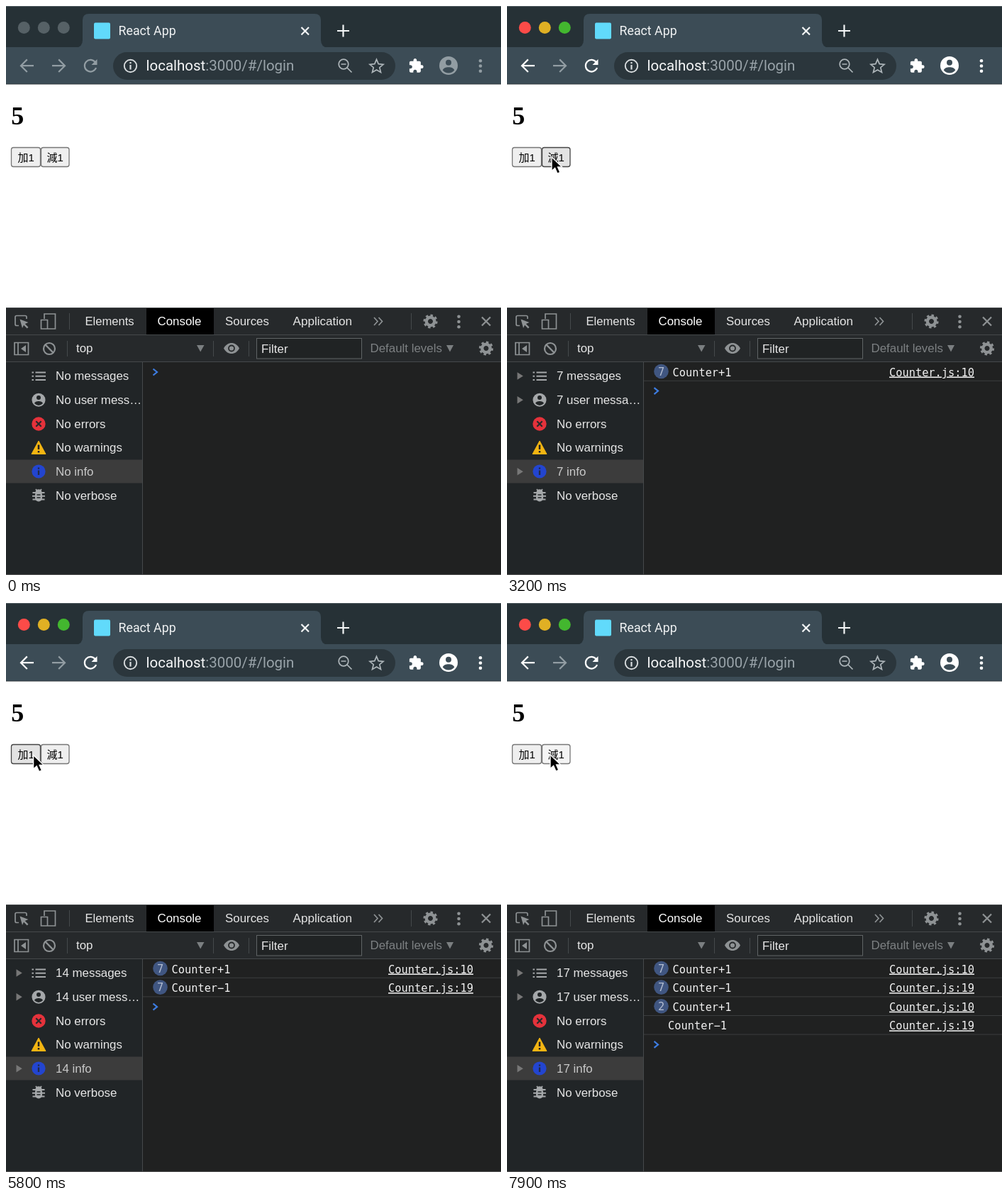
These frames come from a looping animation (698x802 px, 8000 ms). An HTML page:

```html
<!DOCTYPE html>
<html lang="zh-Hant">
<head>
<meta charset="utf-8">
<title>Counter</title>
<style>
html, body { margin: 0; width: 100%; height: 100%; overflow: hidden; background: #202121; }
svg { display: block; width: 698px; height: 802px; }
text { white-space: pre; }
.chrome { font-family: Roboto, sans-serif; }
.tools { font: 16.9px "Liberation Sans", Arial, sans-serif; fill: #e6e6e6; }
.log { font: 15.33px "DejaVu Sans Mono", monospace; fill: #f2f2f2; }
.page { font: 15px "Liberation Sans", "Noto Sans CJK TC", "Noto Sans CJK JP", "Noto Sans CJK SC", "Noto Sans CJK", sans-serif; }
.line { fill: none; stroke: currentColor; stroke-width: 2.2; }
.thin { stroke-width: 1.7; }
.focus { color: #fff; }
.idle .focus { color: #929da3; }
.idle .light { fill: #566166; }
.btn { fill: #efefef; stroke: #767676; }
.btn.hover { fill: #e3e3e3; stroke: #454545; }
.btn.press { fill: #f4f4f4; stroke: #777; }
</style>
</head>
<body>
<svg id="stage" viewBox="0 0 698 802">
  <defs>
    <g id="gear" fill="none" stroke="currentColor">
      <circle r="5.7" stroke-width="4.4"/>
      <circle r="8.4" stroke-width="3.4" pathLength="16" stroke-dasharray="1"/>
    </g>
    <g id="kebab" fill="currentColor"><circle cy="-7.2" r="2.3"/><circle r="2.3"/><circle cy="7.2" r="2.3"/></g>
    <path id="caret" d="M-3.5-5.2L4.8 0L-3.5 5.2z" fill="#777"/>
  </defs>

  <!-- browser frame -->
  <g class="chrome">
    <rect width="698" height="60" fill="#263136"/>
    <path d="M0 .5H698" stroke="#596368"/>
    <rect y="58" width="698" height="52" fill="#3c4c56"/>
    <path d="M98 59Q108 58 108 48V20Q108 11 117 11H435Q444 11 444 20V48Q444 58 454 59z" fill="#3c4c56"/>
    <path d="M0 110H698" stroke="#2d383e"/>
    <circle class="light" cx="25.300" cy="30.500" r="8.500" fill="#fc4b48"/>
    <circle class="light" cx="53.300" cy="30.500" r="8.500" fill="#e0b024"/>
    <circle class="light" cx="81.300" cy="30.500" r="8.500" fill="#43b72f"/>
    <rect x="124" y="23.500" width="23" height="23" rx="2" fill="#61dafb"/>
    <text x="158.500" y="41" font-size="17.800" fill="#f1f3f4">React App</text>
    <g color="#f4f6f7">
      <path class="line" d="M416.500 30L427 40.500M427 30L416.500 40.500M467 35H484M475.500 26.500V43.500"/>
    </g>
    <rect x="151" y="65" width="398" height="39" rx="19.500" fill="#2b363c"/>
    <g color="#d8dcde">
      <circle class="line" cx="175.500" cy="84.500" r="8.700" style="stroke-width:1.9"/>
      <path class="line" d="M175.500 83V89.500M175.500 79V81.300"/>
    </g>
    <text x="197.500" y="91" font-size="20.500" fill="#9aa4aa"><tspan fill="#f6f7f8">localhost</tspan>:3000/#/login</text>
    <g color="#aeb6ba">
      <circle class="line thin" cx="476" cy="82" r="6.800"/>
      <path class="line thin" d="M481 87L487.500 93.500M472.500 82H479.500"/>
      <path class="line thin" d="M522.500 75.300L525.200 81.700L532 82.300L526.800 86.700L528.500 93.500L522.500 89.900L516.500 93.500L518.200 86.700L513 82.300L519.800 81.700z"/>
    </g>
    <g class="focus">
      <path class="line" d="M39 84.200H21M29.800 75.400L21 84.200L29.800 93"/>
      <path class="line" d="M126 79.500A8.300 8.300 0 1 0 127 87"/>
      <path d="M128.500 75V83H120.500z" fill="currentColor"/>
      <circle cx="624" cy="84" r="13" fill="currentColor"/>
      <circle cx="624" cy="79.800" r="4" fill="#3c4c56"/>
      <path d="M615.800 90.500C617 84.800 631 84.800 632.200 90.500Q629 94.500 624 94.500T615.800 90.500z" fill="#3c4c56"/>
      <use href="#kebab" x="669" y="84.500"/>
    </g>
    <path class="line" color="#929da3" d="M65 84.200H83M74.200 75.400L83 84.200L74.200 93"/>
    <path transform="translate(567 73) scale(.94)" fill="#fff" d="M20.500 11H19V7c0-1.100-.9-2-2-2h-4V3.500C13 2.120 11.880 1 10.500 1S8 2.120 8 3.500V5H4c-1.100 0-2 .9-2 2v3.800h1.500c1.490 0 2.700 1.210 2.700 2.700s-1.210 2.700-2.700 2.700H2V20c0 1.100.9 2 2 2h3.800v-1.500c0-1.490 1.210-2.700 2.700-2.700s2.700 1.210 2.700 2.700V22H17c1.100 0 2-.9 2-2v-4h1.500a2.500 2.500 0 0 0 0-5z"/>
  </g>

  <!-- page -->
  <rect y="110.500" width="698" height="315" fill="#fff"/>
  <text x="7.300" y="167" font-family="Liberation Serif, Times New Roman, serif" font-weight="bold" font-size="36">5</text>
  <g class="page">
    <rect id="plus" class="btn" x="7.500" y="199.500" width="41" height="27" rx="3" stroke-width="1.300"/>
    <rect id="minus" class="btn" x="49.500" y="199.500" width="39.500" height="27" rx="3" stroke-width="1.300"/>
    <text x="16.500" y="219">加1</text>
    <text x="57.500" y="219">減1</text>
  </g>

  <!-- developer tools -->
  <rect y="425" width="698" height="377" fill="#202121"/>
  <rect y="425" width="698" height="77" fill="#26292b"/>
  <rect y="502" width="192" height="300" fill="#212527"/>
  <rect y="639.500" width="192" height="33" fill="#3c3c3c"/>
  <rect x="198" y="426" width="95" height="37" fill="#000"/>
  <path d="M0 425.500H698M0 463.500H698M0 501.500H698M192.500 502V802M89.500 433V456M571.500 433V456M86.500 472V494M292.500 472V494M342.500 472V494" stroke="#45494b" fill="none"/>
  <path d="M0 801.500H698" stroke="#555"/>
  <g class="tools">
    <text x="111.500" y="450" font-size="16.600">Elements</text>
    <text x="213.500" y="450" fill="#fff">Console</text>
    <text x="309" y="450">Sources</text>
    <text x="404.500" y="450" font-size="17.100">Application</text>
    <text x="99" y="488">top</text>
    <rect x="353.500" y="468.500" width="148" height="28.500" fill="#202324" stroke="#606466"/>
    <text x="360" y="489">Filter</text>
    <text x="513.500" y="488" style="fill:#7d8183">Default levels</text>
  </g>
  <path d="M269 478H279.500L274.200 487.500zM621 478H631L626 487.500z" fill="#7b7f81"/>
  <g color="#8e9294">
    <path class="line thin" d="M18 450.500H15Q13 450.500 13 448.500V438.500Q13 436.500 15 436.500H27Q29 436.500 29 438.500V441"/>
    <path d="M19.500 441.500L31.500 446L26.800 448L31.500 452.700L29.700 454.500L25 449.800L23 454z" fill="currentColor"/>
    <path class="line thin" d="M54 441V434H69.500V455H59M49.500 442.500H58.500V455H49.500z"/>
    <path class="line thin" d="M519 439L524 444.500L519 450M525.500 439L530.500 444.500L525.500 450"/>
    <use href="#gear" x="598.500" y="444.500"/>
    <use href="#kebab" x="638.500" y="445"/>
    <path class="line" d="M671 438.500L683 450.500M683 438.500L671 450.500"/>
    <path class="line thin" d="M12 474.500H31.500V491.500H12zM17 474.500V491.500"/>
    <path d="M28 478V488L21 483z" fill="currentColor"/>
    <circle class="line" cx="61" cy="483" r="8"/>
    <path class="line" d="M55.400 477.400L66.600 488.600"/>
    <path d="M307 482.500C312 472.500 324 472.500 329 482.500C324 492.500 312 492.500 307 482.500z" fill="currentColor"/>
    <circle cx="318" cy="482.500" r="4" class="line" style="stroke:#26292b;stroke-width:1.800"/>
    <use href="#gear" x="677" y="482.500"/>
  </g>

  <!-- sidebar -->
  <g color="#a5a8aa">
    <path class="line" d="M36.500 516.500H39M36.500 521.700H39M36.500 527H39M41.500 516.500H56M41.500 521.700H56M41.500 527H56" style="stroke-width:2"/>
    <circle cx="46" cy="555.300" r="9.500" fill="currentColor"/>
    <circle cx="46" cy="552" r="3" fill="#212527"/>
    <path d="M40 560C41 556 51 556 52 560Q49 563 46 563T40 560z" fill="#212527"/>
    <circle cx="46" cy="589" r="9.700" fill="#e5323b"/>
    <path d="M42.300 585.300L49.700 592.700M49.700 585.300L42.300 592.700" stroke="#26292b" stroke-width="2.200"/>
    <path d="M46 613L56 631.500H36z" fill="#f3b512" stroke="#f3b512" stroke-linejoin="round"/>
    <path d="M46 618.500V625M46 627V629.500" stroke="#222" stroke-width="2.500"/>
    <circle cx="46" cy="656" r="9.600" fill="#2345cf"/>
    <path d="M46 654.500V661M46 650.500V652.800" stroke="#222b48" stroke-width="2.300"/>
    <g fill="currentColor">
      <rect x="41" y="684" width="10" height="14.500" rx="5"/>
      <path d="M41.500 685A4.600 4.600 0 0 1 50.500 685z"/>
    </g>
    <path class="line" d="M37.500 686H54.500M37 690.700H55M37.500 695.500H54.500M42 681L44 683.500M50 681L48 683.500" style="stroke-width:1.900"/>
    <path d="M43.500 689H48.500M43.500 693H48.500" stroke="#212527" stroke-width="1.700"/>
  </g>
  <g id="carets">
    <use href="#caret" x="18" y="521.500"/><use href="#caret" x="18" y="555.300"/><use href="#caret" x="18" y="656.300"/>
  </g>
  <g class="tools">
    <text id="messages" x="70" y="527.300"/>
    <text id="users" x="70" y="561"/>
    <text x="70" y="594.700">No errors</text>
    <text x="70" y="628.300">No warnings</text>
    <text id="info" x="70" y="662" style="fill:#c9c9c9"/>
    <text x="70" y="695.700">No verbose</text>
  </g>

  <g id="rows" class="log"></g>
  <path id="prompt" d="M207.500-4.500L213 0L207.500 4.500" fill="none" stroke="#3d7ce0" stroke-width="2.200"/>

  <path id="cursor" d="M0 0V19.500L4.600 15.300L8 23L11.800 21.400L8.500 13.900H14.500z" fill="#000" stroke="#fff" stroke-width="1.300"/>
</svg>
<script>
const LOOP = 8000, STEP = 100, FOCUS_AT = 1100, ROW = 26.6;
const clicks = [
  ...[1200, 1500, 1700, 2000, 2200, 2400, 2600].map(t => [t, "+"]),
  ...[3400, 3700, 4000, 4200, 4500, 4700, 4900].map(t => [t, "−"]),
  [6400, "+"], [6800, "+"], [7800, "−"], [8000, "−"]
];
// time, x, y of the pointer tip
const path = [
  [400, 44, 400], [700, 40, 340], [1000, 27, 214], [2700, 27, 214], [3000, 63, 213],
  [3500, 63, 213], [3700, 69, 213], [5400, 69, 213], [6000, 28, 215],
  [7000, 28, 215], [7400, 61, 214], [8000, 61, 214]
];
const $ = id => document.getElementById(id);

function pointer(t) {
  const i = path.findIndex(p => p[0] > t);
  if (i < 1) return null;
  const [a, b] = [path[i - 1], path[i]];
  const u = (t - a[0]) / (b[0] - a[0]);
  const ease = u * u * (3 - 2 * u);
  return [1, 2].map(k => a[k] + (b[k] - a[k]) * ease);
}

function logRow({ sign, count }, i) {
  const y = 516 + i * ROW, many = count > 1;
  const badge = many ? `<circle cx="217.500" cy="${y - 1}" r="10.300" fill="#405681"/>
    <text x="217.500" y="${y + 4.5}" text-anchor="middle" style="fill:#b3bdd0">${count}</text>` : "";
  return `${badge}<text x="${many ? 233.5 : 227}" y="${y + 5.5}">Counter${sign}1</text>
    <text x="539" y="${y + 5.5}" text-decoration="underline">Counter.js:${sign === "+" ? 10 : 19}</text>
    <path d="M193 ${y + 12.3}H698" stroke="#3b3d3e"/>`;
}

function setButton(id, over, pressed) {
  $(id).setAttribute("class", "btn" + (over ? pressed ? " press" : " hover" : ""));
}

function draw(t) {
  const done = clicks.filter(c => c[0] <= t), n = done.length;
  const groups = [];
  for (const [, sign] of done) {
    const last = groups[groups.length - 1];
    if (last && last.sign === sign) last.count++;
    else groups.push({ sign, count: 1 });
  }
  $("rows").innerHTML = groups.map(logRow).join("");
  $("prompt").setAttribute("transform", `translate(0 ${516 + groups.length * ROW})`);

  const label = n || "No";
  $("messages").textContent = `${label} message${n === 1 ? "" : "s"}`;
  $("users").textContent = `${label} user mess${n > 0 && n < 10 ? "a" : ""}…`;
  $("info").textContent = `${label} info`;
  $("carets").style.display = n ? "" : "none";
  $("stage").classList.toggle("idle", t < FOCUS_AT);

  const p = pointer(t);
  $("cursor").style.display = p ? "" : "none";
  if (p) $("cursor").setAttribute("transform", `translate(${p})`);
  const over = p && p[1] < 227;
  const pressed = clicks.some(c => t < c[0] && t >= c[0] - STEP);
  setButton("plus", over && p[0] < 49, pressed);
  setButton("minus", over && p[0] >= 49, pressed);
}

const start = performance.now();
let shown = -1;
function tick() {
  const t = Math.floor((performance.now() - start) % LOOP / STEP) * STEP;
  if (t !== shown) draw(shown = t);
  requestAnimationFrame(tick);
}
tick();
</script>
</body>
</html>
```
